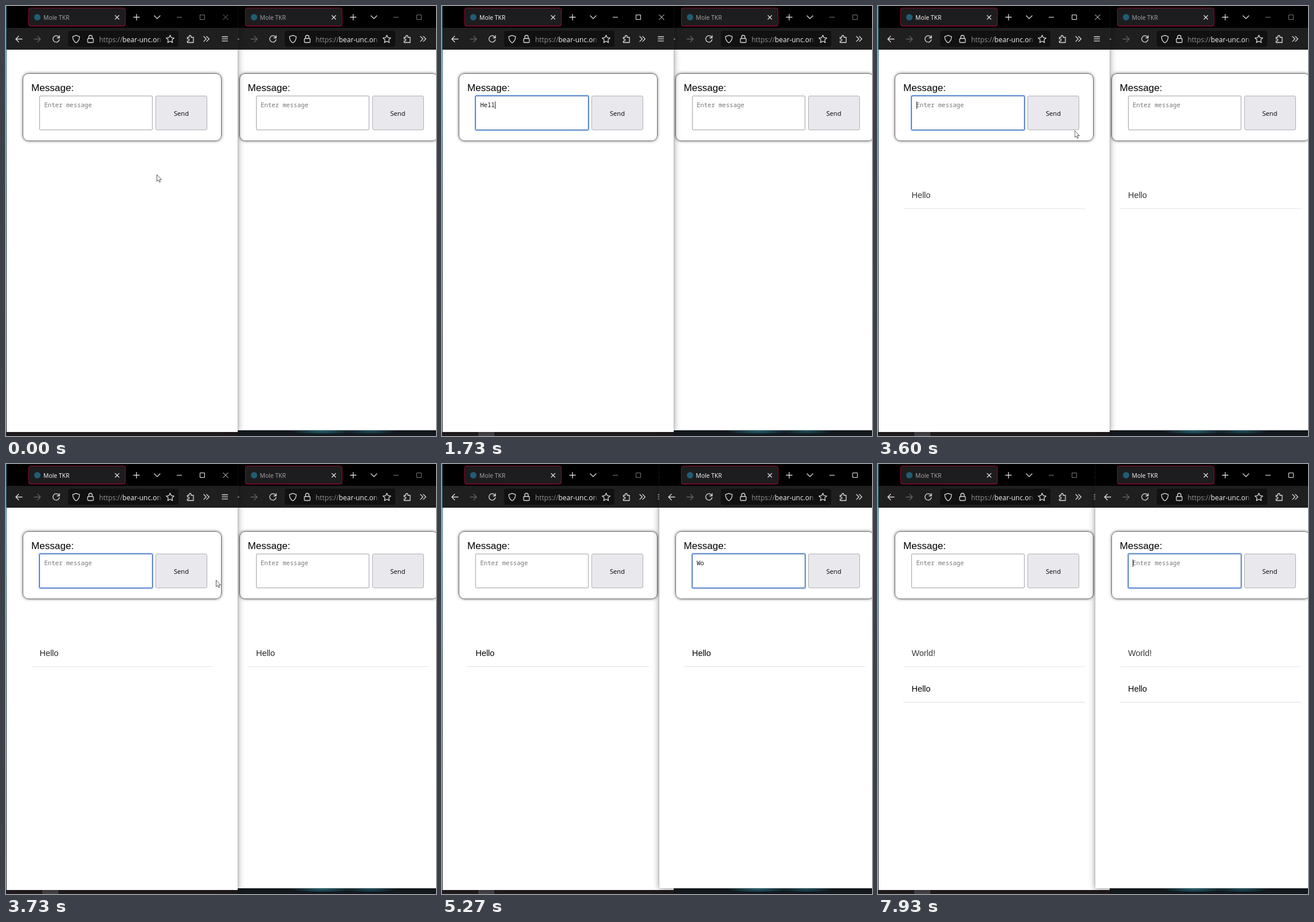
An HTML page for the animation above (8000 ms loop, 748x748 px).

```html
<!DOCTYPE html>
<html lang="en">
<head>
<meta charset="utf-8">
<title>Two chat windows</title>
<style>
html, body { margin: 0; width: 100%; height: 100%; overflow: hidden; }
#stage { position: relative; width: 748px; height: 748px; overflow: hidden; background: #241d20; }
#stage div, #stage span, #stage svg { position: absolute; box-sizing: border-box; white-space: pre; }
#edge { left: 0; top: 0; width: 1px; height: 748px; z-index: 3; background: linear-gradient(#2b7d95, #1d5f78 20%, #12303f 45%, #1a1c20); }
#desk { left: 402px; top: 736px; width: 346px; height: 12px;
  background: radial-gradient(ellipse 56px 5px at 148px 4px, #2a7688, transparent),
    radial-gradient(ellipse 46px 5px at 232px 4px, #215f70, transparent), #141b20; }
#task { left: 63px; top: 741px; width: 28px; height: 7px; background: #48464a; }
.win { top: 0; width: 402px; background: #fff; box-shadow: 0 0 1px #666, 0 0 11px rgba(0,0,0,.45); }
.view { left: 0; top: 0; width: 100%; height: 100%; overflow: hidden; }
.head { left: 0; top: 0; width: 100%; height: 75.5px; background: linear-gradient(#000 38px, #1f1f1f 38px); }
.tab { left: 38px; top: 3px; width: 169px; height: 32px; border: 1px solid #8a0a2e; border-radius: 4px;
  background: #1d1c1e; box-shadow: 0 .5px 1px #8a0a2e; }
.mark { left: 48px; top: 14px; width: 11px; height: 11px; border-radius: 50%; background: #215d74; }
.name { left: 64px; top: 12px; font: 10.4px/16px "Open Sans", sans-serif; }
.bar { left: 107px; top: 43px; width: 192px; height: 28px; border-radius: 4px; background: #111; }
.url { left: 161px; top: 49px; width: 109px; overflow: hidden; color: #f4f4f6; font: 11.9px/18px "Open Sans", sans-serif;
  -webkit-mask: linear-gradient(90deg, #000 92%, transparent); mask: linear-gradient(90deg, #000 92%, transparent); }
.url i { color: #929296; font-style: normal; }
.icons { left: 0; top: 0; fill: none; stroke: #dcdcdf; stroke-width: 1.3; stroke-linecap: round; stroke-linejoin: round; }
.icons .dim { stroke: #626264; }
.icons .ctl { stroke-width: 1; stroke-linecap: butt; stroke-linejoin: miter; }
.card { left: 28px; top: 117px; width: 346px; height: 118px; border-radius: 10px; border: 1px solid #747474; box-shadow: 0 0 5px rgba(0,0,0,.55); }
.label { left: 43px; top: 132px; color: #000; font: 17.1px/22px "Liberation Sans", Arial, sans-serif; }
.input { left: 57px; top: 156px; width: 197px; height: 60px; border: 1px solid #a2a2a6; border-radius: 2px; }
.input.on { border-color: #2456ab; box-shadow: 0 0 0 1px #a3c3f3, 0 0 0 2px #d2e2fa; }
.text { left: 65.5px; top: 164px; font: 10.63px/16px "Noto Sans Mono", monospace; }
.caret { top: 166px; width: 1px; height: 13px; background: #222; }
.send { left: 259px; top: 156px; width: 90px; height: 60px; border: 1px solid #b0b0b4; border-radius: 3px;
  background: #e9e9ed; color: #000; text-align: center; font: 11.2px/60px "Open Sans", sans-serif; }
.post { left: 43px; top: 302px; width: 315.5px; height: 51px; border-bottom: 1px solid #e0e0e0; padding-left: 14.5px;
  color: #000; font: 14.4px/54px "Liberation Sans", Arial, sans-serif; }
#mouse { left: 0; top: 0; z-index: 9; }
</style>
</head>
<body>
<div id="stage">
  <div id="edge"></div><div id="desk"></div><div id="task"></div>
  <svg id="mouse" width="20" height="24">
    <path id="arrow" d="M.5 .5V12L3 9.6l1.9 4 1.8-.8L4.900 8.900H8.500Z" fill="#fff" stroke="#444" stroke-width=".9"/>
    <path id="beam" d="M1 .5H3L4 1.5L5 .5H7M4 1.5V14.5M1 15.5H3L4 14.5L5 15.5H7" fill="none" stroke="#333"/>
  </svg>
</div>
<script>
const LOOP = 8000, FOCUS_LEFT = 530, FOCUS_RIGHT = 4270, SECOND_POST = 6870;
const $ = id => document.getElementById(id);
const stage = $('stage');

const markup = `<div class="view">
  <div class="head"></div><div class="tab"></div><div class="mark"></div><span class="name">Mole TKR</span>
  <div class="bar"></div><span class="url"><i>https://</i>bear-unc.onrender</span>
  <svg class="icons" width="402" height="75">
    <path d="M189 16.5l6.5 6.5m0-6.5l-6.5 6.5M221 19.5h10m-5-5v10M257 17l5 5 5-5"/>
    <path d="M27 57.5H16m5-5l-5 5 5 5"/><path class="dim" d="M48 57.5H59m-5-5l5 5-5 5"/>
    <path d="M91 54.2a5.6 5.6 0 1 0 .8 4.3M92 51.5v4h-4"/>
    <path d="M121 51.2l5.8 2c0 5-1.5 8.3-5.8 10.8c-4.3-2.5-5.8-5.8-5.8-10.8z"/>
    <rect x="141" y="56.5" width="10" height="7" rx="1.3"/><path d="M143 56.5v-2.5a3 3 0 0 1 6 0v2.5"/>
    <path d="M284.5 50.8l2 4.3 4.7.6-3.4 3.2.9 4.7-4.2-2.3-4.2 2.3.9-4.7-3.4-3.2 4.7-.6z"/>
    <path d="M314.5 54.5h3v-1.5a1.7 1.7 0 0 1 3.5 0v1.5h4v9h-10.5v-2.7h1.5a1.7 1.7 0 0 0 0-3.5h-1.5z"/>
    <path d="M343 53l4.3 4.3-4.3 4.3m5-8.6l4.3 4.3-4.3 4.3M375 53.5h9.5m-9.5 3.7h9.5m-9.5 3.7h9.5"/>
    <path class="ctl" d="M296 19.5h9M336.5 15.5h8v8h-8zM376.5 15l9 9m0-9l-9 9"/>
  </svg>
  <div class="card"></div><span class="label">Message:</span>
  <div class="input"></div><span class="text"></span><div class="caret"></div><div class="send">Send</div>
  <div class="post">World!</div><div class="post">Hello</div>
</div>`;

function makeWindow(x, height) {
  const el = document.createElement('div');
  el.className = 'win';
  el.style.cssText = `left:${x}px;height:${height}px`;
  el.innerHTML = markup;
  stage.append(el);
  const part = name => el.querySelector('.' + name);
  return { el, name: part('name'), ctl: part('ctl'), input: part('input'), text: part('text'),
    caret: part('caret'), posts: el.querySelectorAll('.post') };
}

const left = makeWindow(1, 741), right = makeWindow(377.5, 738);
const leftTyping = { word: 'Hello', keys: [1330, 1470, 1600, 1730, 2000], sent: 2200, click: FOCUS_LEFT };
const rightTyping = { word: 'World!', keys: [5070, 5200, 5400, 5600, 5800, 6330], sent: 6730, click: FOCUS_RIGHT };

// Fade of a new post: two seconds, slowing down.
const fade = (t, start) => {
  const p = Math.min(1, Math.max(0, (t - start) / 2000));
  return 1 - (1 - p) ** 2;
};

function drawWindow(win, typing, focused, showTypingCaret, t) {
  win.name.style.color = focused ? '#fff' : '#aaa';
  win.ctl.style.stroke = focused ? '#eee' : '#777';
  win.input.classList.toggle('on', focused);

  const count = t < typing.sent ? typing.keys.filter(k => k <= t).length : 0;
  win.text.textContent = count ? typing.word.slice(0, count) : 'Enter message';
  win.text.style.color = count ? '#111' : '#777';

  const last = Math.max(...[typing.click, ...typing.keys, typing.sent].filter(k => k <= t));
  const lit = focused && (t - last) % 1000 < 500 && (!count || showTypingCaret);
  win.caret.style.display = lit ? 'block' : 'none';
  win.caret.style.left = 65.5 + count * 6.38 + 'px';

  const [world, hello] = win.posts;
  world.style.opacity = fade(t, SECOND_POST);
  hello.style.opacity = fade(t, 2490);
  hello.style.top = (t < SECOND_POST ? 302 : 364) + 'px';
}

// Pointer stops: time, x, y.
const trips = [
  [[0, 262, 293], [70, 262, 293], [470, 114, 157], [1470, 114, 157]],
  [[3470, 318, 232], [3730, 365, 201.5], [4200, 538, 178], [5070, 538, 178]]
];

function drawMouse(t) {
  const trip = trips.find(s => t >= s[0][0] && t < s.at(-1)[0]);
  $('mouse').style.display = trip ? 'block' : 'none';
  if (!trip) return;
  const i = trip.findIndex(s => s[0] > t), a = trip[i - 1], b = trip[i];
  const p = (t - a[0]) / (b[0] - a[0]), q = p * p * (3 - 2 * p);
  const x = a[1] + (b[1] - a[1]) * q, y = a[2] + (b[2] - a[2]) * q;
  const overInput = y > 150 && y < 216 && (x > 58 && x < 255 || x > 434 && x < 631);
  $('mouse').style.transform = `translate(${x}px,${y}px)`;
  $('arrow').style.display = overInput ? 'none' : 'inline';
  $('beam').style.display = overInput ? 'inline' : 'none';
}

function frame() {
  const t = performance.now() % LOOP;
  const rightFocus = t >= FOCUS_RIGHT;
  drawWindow(left, leftTyping, t >= FOCUS_LEFT && !rightFocus, true, t);
  drawWindow(right, rightTyping, rightFocus, false, t);
  left.el.style.zIndex = 1;
  right.el.style.zIndex = rightFocus ? 2 : 0;
  $('task').style.display = t >= FOCUS_LEFT ? 'block' : 'none';
  drawMouse(t);
  requestAnimationFrame(frame);
}
frame();
</script>
</body>
</html>
```
